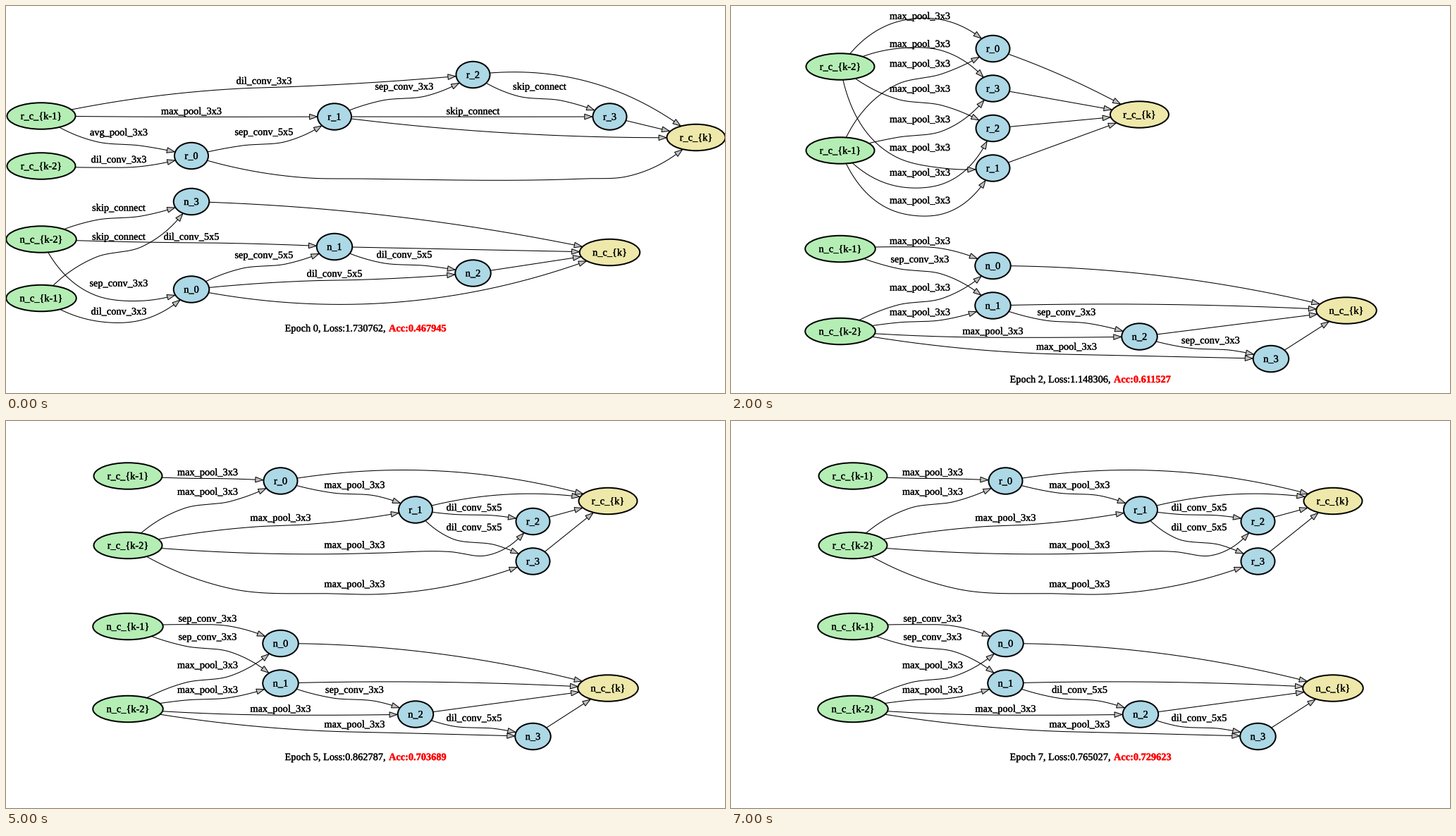
A matplotlib script that plays this animation: 1020x549 px, repeating every 8000 ms.

```python
import numpy as np
import matplotlib.pyplot as plt
from matplotlib.animation import FuncAnimation
from matplotlib.patches import Ellipse, Polygon
from matplotlib.patheffects import withStroke

W, H, DPI = 1020, 549, 64
PX = 72 / DPI  # points per pixel

plt.rcParams["font.family"] = "Liberation Serif"
fig = plt.figure(figsize=(W / DPI, H / DPI), dpi=DPI, facecolor="white")
ax = fig.add_axes([0, 0, 1, 1])

MAX3, AVG3, SKIP = "max_pool_3x3", "avg_pool_3x3", "skip_connect"
SEP3, SEP5 = "sep_conv_3x3", "sep_conv_5x5"
DIL3, DIL5 = "dil_conv_3x3", "dil_conv_5x5"

LOSS = "1.730762 1.329798 1.148306 1.020913 0.918599 0.862787 0.809514 0.765027".split()
ACC = "0.467945 0.564795 0.611527 0.646182 0.692373 0.703689 0.718245 0.729623".split()

# Column positions: even ones hold nodes, odd ones hold the labels between.
COLS_FIRST = (50, 160, 263, 366, 466, 565, 662.5, 757, 856.5, 918, 979)
COLS_WIDE = (157, 270, 374, 478.5, 565.5, 648, 748, 810, 871)
COLS_FLAT = (155, 268, 371.5, 476, 579.5, 680.5, 766, 820, 873)
COLS_DEEP = (173, 286, 389.5, 494.5, 581, 664, 747.5, 800, 854)


def write(x, y, s, color="black", **kw):
    ax.text(x, y + 4.6, s, va="baseline", fontsize=14.35 * PX, color=color,
            zorder=4, path_effects=[withStroke(linewidth=0.3 * PX, foreground=color)],
            **kw)


def smooth(pts):
    """Hermite spline through the points, parametrised by chord length."""
    p = np.array(pts, float)
    t = np.r_[0, np.cumsum(np.hypot(*np.diff(p, axis=0).T))]
    m = np.gradient(p, t, axis=0, edge_order=2)
    u = np.linspace(0, 1, 300)[:, None]
    out = []
    for i, h in enumerate(np.diff(t)):
        out.append((2*u**3 - 3*u**2 + 1) * p[i] + (u**3 - 2*u**2 + u) * h * m[i]
                   + (3*u**2 - 2*u**3) * p[i+1] + (u**3 - u**2) * h * m[i+1])
    return np.vstack(out)


def arrow(line):
    tip = line[-1]
    back = line[np.hypot(*(line - tip).T) >= 9][-1]
    d = (tip - back) / np.hypot(*(tip - back))
    base, side = tip - 10.8 * d, 3.8 * np.array([-d[1], d[0]])
    ax.plot(*line.T, color="black", lw=1.05 * PX, zorder=1)
    ax.add_patch(Polygon([tip, base + side, base - side], fc="#bebebe",
                         ec="black", lw=PX, joinstyle="miter", zorder=3))


class Cell:
    """A left-to-right graph; nodes sit on columns, labels between them."""

    def __init__(self, kind, cols, dy=0):
        self.kind, self.cols, self.dy = kind, cols, dy
        self.spots = {}

    def column(self, col, ys):
        for key, y in ys.items():
            self.node(key, col, y)

    def node(self, key, col, y):
        if key == "k":
            w, color = 83, "#eee8aa"
        elif str(key).startswith("k"):
            w, color = 97, "#b4eeb4"
        else:
            w, color = 48, "#add8e6"
        w += 2.5 * (self.kind == "n")
        x, y = self.cols[col], y + self.dy
        self.spots[key] = col, x, y, w / 2
        ax.add_patch(Ellipse((x, y), w, 37.5, fc=color, ec="black",
                             lw=2 * PX, zorder=2))
        name = f"c_{{{key}}}" if "k" in str(key) else key
        write(x, y, f"{self.kind}_{name}", ha="center")

    def edge(self, src, dst, op=None, y=0, bow=0, via=()):
        """Labelled edges run just below their label, others bow off the chord."""
        c0, x0, y0, _ = self.spots[src]
        c1, x1, y1, rx = self.spots[dst]
        slope = (y1 - y0) / (x1 - x0)
        if op:
            x, y = self.cols[(c0 + c1) // 2], y + self.dy
            write(x, y, op, ha="center")
            sag = y - (y0 + slope * (x - x0))
            under = y + np.clip(9 + 30 * abs(slope) + 0.1 * sag, 7, 22)
            mid = [(x + s, under + 0.35 * slope * s) for s in (-32, 32)]
        else:
            mid = [] if via else [((x0 + x1) / 2, (y0 + y1) / 2 + bow)]
        line = smooth([(x0, y0), *sorted([*mid, *via]), (x1, y1)])
        inside = np.hypot((line[:, 0] - x1) / (rx + 1),
                          (line[:, 1] - y1) / 19.75) < 1
        arrow(line[:inside.argmax() + 1])

    def fan(self, src, op, label_ys):
        for dst, y in label_ys.items():
            self.edge(src, dst, op, y)

    def outputs(self, bows):
        for src, bow in bows.items():
            self.edge(src, "k", bow=bow)


def reduce_first():
    c = Cell("r", COLS_FIRST)
    c.column(0, {"k-1": 156, "k-2": 227})
    for key, y in enumerate((212.5, 157, 97.5, 157)):
        c.node(key, 2 * key + 2, y)
    c.node("k", 10, 186.5)
    c.edge("k-1", 2, DIL3, 106)
    c.edge("k-1", 1, MAX3, 149)
    c.edge("k-1", 0, AVG3, 179)
    c.edge("k-2", 0, DIL3, 217.5)
    c.edge(0, 1, SEP5, 178.5)
    c.edge(1, 2, SEP3, 114)
    c.edge(1, 3, SKIP, 149)
    c.edge(2, 3, SKIP, 114)
    c.edge(0, "k", via=[(430, 244), (500, 245), (820, 245), (880, 242)])
    c.outputs({1: 9, 2: -36, 3: 0})


def normal_first():
    c = Cell("n", COLS_FIRST)
    c.column(0, {"k-2": 331, "k-1": 414.5})
    c.column(2, {3: 277.5, 0: 402})
    c.node(1, 4, 341.5)
    c.node(2, 6, 379)
    c.node("k", 8, 349.5)
    c.edge("k-2", 3, SKIP, 286)
    c.edge("k-2", 1, DIL5, 327)
    c.edge("k-2", 0, SEP3, 393)
    c.edge("k-1", 3, SKIP, 327)
    c.edge("k-1", 0, DIL3, 433)
    c.edge(0, 1, SEP5, 353)
    c.edge(0, 2, DIL5, 379.5)
    c.edge(1, 2, DIL5, 352.5)
    c.outputs({3: -14, 1: 0, 0: 44, 2: 0})


def reduce_wide():
    c = Cell("r", COLS_WIDE)
    c.column(0, {"k-2": 86, "k-1": 225})
    c.column(2, {0: 90.5, 3: 147, 1: 203.5})
    c.node(2, 4, 59.5)
    c.node("k", 6, 127.5)
    c.fan("k-2", MAX3, {2: 34, 0: 79.5, 3: 100, 1: 175.5})
    c.fan("k-1", MAX3, {0: 140, 3: 215.5, 1: 255.5})
    c.edge(0, 2, DIL5, 59)
    c.outputs({0: 0, 2: -12, 3: 0, 1: 0})


def reduce_flat():
    c = Cell("r", COLS_FLAT)
    c.column(0, {"k-2": 86, "k-1": 205})
    c.column(2, {0: 60.5, 3: 117, 2: 173.5, 1: 230})
    c.node("k", 4, 154)
    c.fan("k-2", MAX3, {0: 14, 3: 53.5, 2: 117, 1: 200.5})
    c.fan("k-1", MAX3, {0: 81.5, 3: 160.5, 2: 236, 1: 275.5})
    c.outputs({0: -6, 3: 0, 2: 0, 1: 0})


def reduce_swap():
    c = Cell("r", COLS_WIDE)
    c.column(0, {"k-2": 82, "k-1": 221})
    c.column(2, {1: 91.5, 2: 150, 0: 206.5})
    c.node(3, 4, 105)
    c.node("k", 6, 129)
    c.fan("k-2", MAX3, {3: 38.5, 1: 75.5, 2: 97.5, 0: 172.5})
    c.fan("k-1", MAX3, {1: 137, 2: 212.5, 0: 251.5})
    c.edge(1, 3, DIL5, 88.5)
    c.outputs({1: -40, 3: 0, 2: 0, 0: 0})


def reduce_deep():
    c = Cell("r", COLS_DEEP)
    c.column(0, {"k-1": 78, "k-2": 176.5})
    c.node(0, 2, 85)
    c.node(1, 4, 126)
    c.column(6, {2: 142.5, 3: 199})
    c.node("k", 8, 113.5)
    c.edge("k-1", 0, MAX3, 72.5)
    c.fan("k-2", MAX3, {0: 100, 1: 137})
    c.edge("k-2", 2, MAX3, 175.5, via=[(630, 185.5), (680, 191)])
    c.edge("k-2", 3, MAX3, 231, via=[(320, 238)])
    c.edge(0, 1, MAX3, 90.5)
    c.fan(1, DIL5, {2: 122.5, 3: 150.5})
    c.outputs({0: -28, 1: -16, 2: 0, 3: 0})


def normal(cols, dy, first=SEP3, mid=SEP3, last=DIL5):
    c = Cell("n", cols, dy)
    c.column(0, {"k-1": 324, "k-2": 441})
    c.column(2, {0: 348, 1: 404.5})
    c.node(2, 4, 448.5)
    c.node(3, 6, 480)
    c.node("k", 8, 411.5)
    c.edge("k-1", 0, first, 312.5)
    c.edge("k-1", 1, SEP3, 338.5)
    c.fan("k-2", MAX3, {0: 378.5, 1: 413.5, 2: 440.5, 3: 462.5})
    c.edge(1, 2, mid, 413.5)
    c.edge(2, 3, last, 453.5)
    c.outputs({0: -16, 1: -5, 2: 0, 3: 0})


def draw(epoch):
    ax.clear()
    ax.set(xlim=(0, W), ylim=(H, 0))
    ax.axis("off")
    if epoch == 0:
        dy = -52
        reduce_first()
        normal_first()
    elif epoch == 1:
        dy = 0
        reduce_wide()
        normal(COLS_WIDE, dy)
    elif epoch <= 3:
        dy = 20.5
        reduce_flat()
        normal(COLS_FLAT, dy, first=MAX3, last=SEP3)
    elif epoch == 4:
        dy = -3.5
        reduce_swap()
        normal(COLS_WIDE, dy)
    else:
        dy = -32.5
        reduce_deep()
        normal(COLS_DEEP, dy, mid=SEP3 if epoch == 5 else DIL5)
    write(395.5, 509 + dy, f"Epoch {epoch}, Loss:{LOSS[epoch]},")
    write(543, 509 + dy, f"Acc:{ACC[epoch]}", color="red", weight="bold")
    return []


anim = FuncAnimation(fig, draw, frames=len(LOSS), interval=1000,
                     init_func=lambda: [], repeat=True, repeat_delay=0)
plt.show()
```
